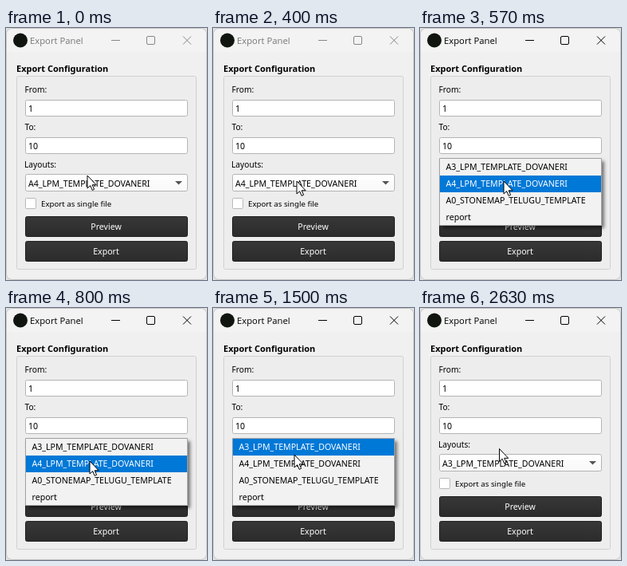
Write an HTML page with a canvas that moves like this. It is 252 px wide and 316 px high and loops after 3.41 s.

```html
<!DOCTYPE html>
<html lang="en">
<head>
<meta charset="utf-8">
<title>Export Panel</title>
<style>
  html, body { margin: 0; width: 100%; height: 100%; overflow: hidden; background: #f0f0f0; }
  canvas { display: block; width: 252px; height: 316px; }
</style>
</head>
<body>
<canvas id="stage"></canvas>
<script>
const W = 252, H = 316, LOOP = 3410;
const canvas = document.getElementById('stage');
const ctx = canvas.getContext('2d');
const dpr = window.devicePixelRatio || 1;
canvas.width = W * dpr;
canvas.height = H * dpr;
ctx.scale(dpr, dpr);

const UI = '"Noto Sans", "Open Sans", sans-serif';
const TITLE = '"Open Sans", "Noto Sans", sans-serif';
const A3 = 'A3_LPM_TEMPLATE_DOVANERI';
const A4 = 'A4_LPM_TEMPLATE_DOVANERI';
const ITEMS = [A3, A4, 'A0_STONEMAP_TELUGU_TEMPLATE', 'report'];

function text(str, x, y, { size = 10.6, color = '#000', family = UI, weight = 400, align = 'left' } = {}) {
  ctx.font = `${weight} ${size}px ${family}`;
  ctx.textAlign = align;
  ctx.fillStyle = color;
  ctx.fillText(str, x, y);
}

function box(x, y, w, h, r, fill, stroke) {
  ctx.beginPath();
  ctx.roundRect(x + 0.5, y + 0.5, w - 1, h - 1, r);
  if (fill) { ctx.fillStyle = fill; ctx.fill(); }
  if (stroke) { ctx.strokeStyle = stroke; ctx.lineWidth = 1; ctx.stroke(); }
}

function shade(y, h, top, bottom) {
  const g = ctx.createLinearGradient(0, y, 0, y + h);
  g.addColorStop(0, top);
  g.addColorStop(1, bottom);
  return g;
}

function drawWindow(active) {
  ctx.fillStyle = '#e2e2e2';
  ctx.fillRect(0, 0, W, H);
  box(0, 0, W, H, 7, '#f0f0f0', '#c4c4c4');
  ctx.fillStyle = '#f3f3f3';
  ctx.beginPath();
  ctx.roundRect(1, 1, W - 2, 29, [7, 7, 0, 0]);
  ctx.fill();

  ctx.fillStyle = '#101510';
  ctx.beginPath();
  ctx.arc(18, 15.5, 9, 0, Math.PI * 2);
  ctx.fill();

  const ink = active ? '#000' : '#868686';
  text('Export Panel', 30, 20, { size: 11.3, color: active ? '#000' : '#777', family: TITLE });
  ctx.strokeStyle = ink;
  ctx.lineWidth = 1;
  ctx.beginPath();
  ctx.moveTo(132, 15.5); ctx.lineTo(143, 15.5);
  ctx.moveTo(222, 10.5); ctx.lineTo(232, 20.5);
  ctx.moveTo(232, 10.5); ctx.lineTo(222, 20.5);
  ctx.stroke();
  box(176, 10, 11, 11, 1.5, null, ink);
}

function drawField(label, value, y) {
  text(label, 23.5, y - 9, { size: 10.2 });
  box(24, y, 204, 21, 2, '#fff', '#b4b4b4');
  text(value, 28, y + 15);
}

function drawButton(label, y) {
  box(24, y, 204, 26, 2, shade(y, 26, '#383838', '#2b2b2b'), '#202020');
  text(label, 125.5, y + 17, { color: '#fff', align: 'center' });
}

function drawCombo(value, pressed) {
  const d = pressed ? 1 : 0;
  text('Layouts:', 23, 175, { size: 10.2 });
  box(24, 183, 204, 22, 2,
    pressed ? '#dcdcdc' : shade(183, 22, '#fff', '#f8f8f8'),
    pressed ? '#a8a8a8' : '#b4b4b4');
  text(value, 28 + d, 199 + d);
  ctx.fillStyle = '#555';
  ctx.beginPath();
  ctx.moveTo(212, 192);
  ctx.lineTo(221, 192);
  ctx.lineTo(216.5, 196.5);
  ctx.fill();
}

function drawForm(value, pressed) {
  text('Export Configuration', 13, 55, { size: 11, weight: 700 });
  box(13, 60, 226, 243, 2, '#ededed', '#d1d1d1');
  drawField('From:', '1', 90);
  drawField('To:', '10', 137);
  drawCombo(value, pressed);
  box(24, 213, 14, 14, 1, '#fff', '#b8b8b8');
  text('Export as single file', 44, 224, { size: 9.7 });
  drawButton('Preview', 236);
  drawButton('Export', 267);
}

function drawPopup(selected) {
  ctx.save();
  ctx.shadowColor = 'rgba(0,0,0,.5)';
  ctx.shadowBlur = 4 * dpr;
  ctx.shadowOffsetX = ctx.shadowOffsetY = 2.5 * dpr;
  ctx.fillStyle = '#f2f2f2';
  ctx.fillRect(25, 164, 203, 84);
  ctx.restore();
  box(24, 163, 204, 85, 0, '#f2f2f2', '#a0a0a0');
  ITEMS.forEach((item, i) => {
    const y = 164 + i * 21;
    if (i === selected) {
      ctx.fillStyle = '#0078d7';
      ctx.fillRect(25, y, 202, 21);
    }
    text(item, 32.5, y + 14, { color: i === selected ? '#fff' : '#000' });
  });
}

const ARROW = [0, 0, 0, 16, 3.7, 12.7, 6.2, 18.4, 8.6, 17.3, 6.2, 11.8, 11.2, 11.8];

function drawCursor([x, y]) {
  ctx.beginPath();
  for (let i = 0; i < ARROW.length; i += 2) ctx.lineTo(x + ARROW[i], y + ARROW[i + 1]);
  ctx.closePath();
  ctx.fillStyle = '#fff';
  ctx.fill();
  ctx.strokeStyle = '#000';
  ctx.lineWidth = 1;
  ctx.stroke();
}

// Pointer moves in discrete steps, as recorded at a low rate.
const MOVES = [
  { times: [270, 310, 350, 400], from: [102, 185], to: [105, 192] },
  { times: [1430], from: [105, 192], to: [102.5, 186.5] },
  { times: [1470, 1510, 1560, 1600], from: [102.5, 186.5], to: [99.5, 176.5] }
];

function pointer(t) {
  let pos = MOVES[0].from;
  for (const { times, from, to } of MOVES) {
    const k = times.filter(s => t >= s).length / times.length;
    if (k) pos = from.map((v, i) => Math.round((v + (to[i] - v) * k) * 2) / 2);
  }
  return pos;
}

function render(t) {
  const pos = pointer(t);
  const open = t >= 570 && t < 2630;
  drawWindow(t >= 530);
  drawForm(t >= 2630 ? A3 : A4, t >= 530 && t < 2630);
  if (open) drawPopup(Math.floor((pos[1] - 164) / 21));
  drawCursor(pos);
}

const start = performance.now();
function tick() {
  render((performance.now() - start) % LOOP);
  requestAnimationFrame(tick);
}
tick();
</script>
</body>
</html>
```
